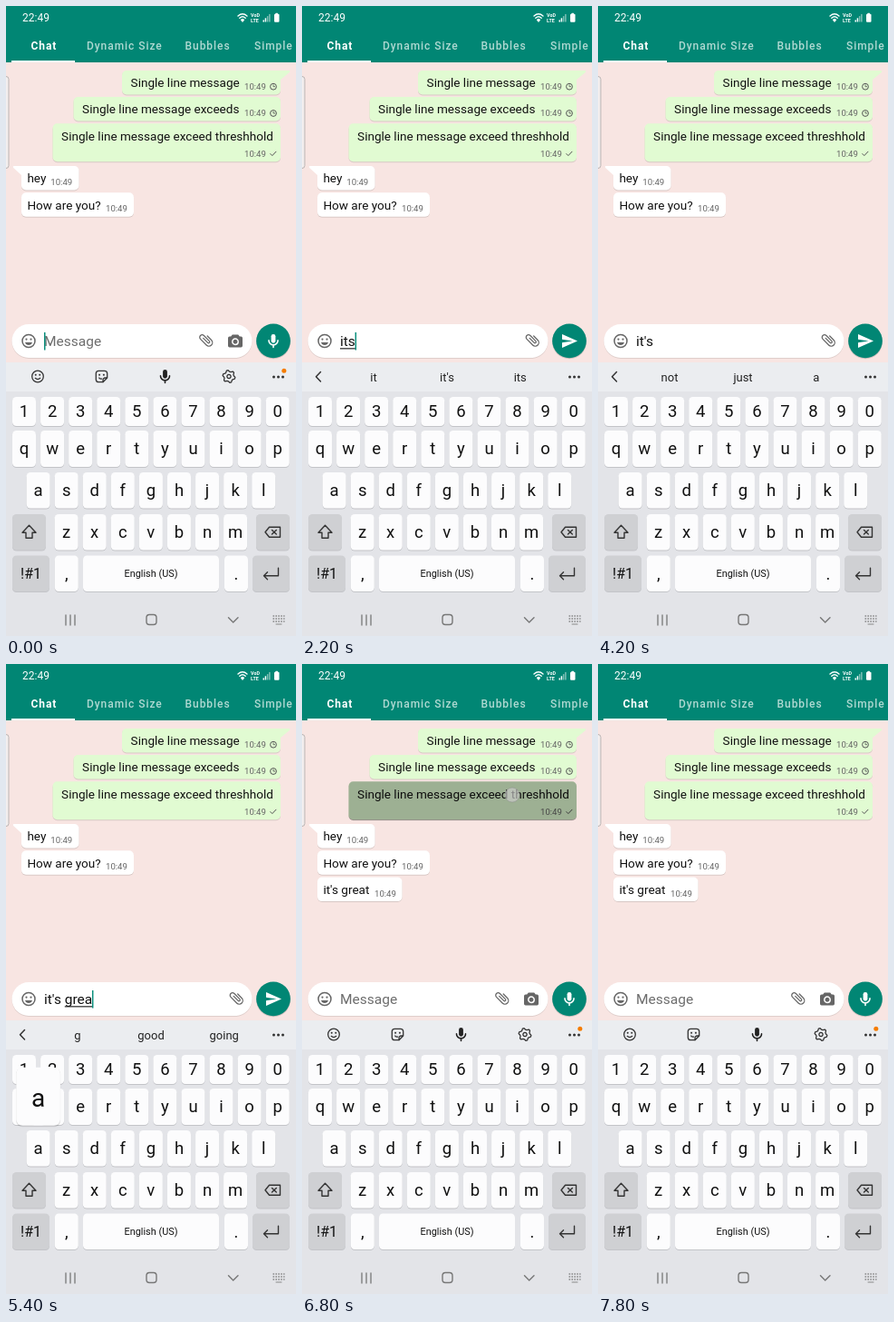
Write an HTML page that moves like this. It is 320 by 693 pixels and loops after 8 s.

```html
<!DOCTYPE html>
<html lang="en">
<head>
<meta charset="utf-8">
<title>Chat typing</title>
<style>
  html, body { margin: 0; width: 100%; height: 100%; overflow: hidden; background: #f8e5e2; }
  svg { display: block; width: 100vw; height: 100vh; }
  text { font-family: Roboto, sans-serif; white-space: pre; fill: #111; }
  .tab { font-size: 12px; font-weight: 500; letter-spacing: .95px; fill: #b0d9d2; }
  .msg { font-size: 13.55px; }
  .time { font-size: 9.6px; fill: #666; }
  .key { font-size: 18.5px; text-anchor: middle; }
  .field { font-size: 15.5px; }
  .hint { font-size: 13px; text-anchor: middle; fill: #222; }
  .line { fill: none; stroke-linecap: round; stroke-linejoin: round; }
</style>
</head>
<body>
<svg id="stage" viewBox="0 0 320 693"></svg>
<script>
const TEAL = '#018674', GREY = '#666', INK = '#333';
const stage = document.getElementById('stage');

const rect = (x, y, w, h, r, fill, extra = '') =>
  `<rect x="${x}" y="${y}" width="${w}" height="${h}" rx="${r}" fill="${fill}" ${extra}/>`;
const circle = (x, y, r, fill, extra = '') =>
  `<circle cx="${x}" cy="${y}" r="${r}" fill="${fill}" ${extra}/>`;
const text = (x, y, cls, str, extra = '') =>
  `<text x="${x}" y="${y}" class="${cls}" ${extra}>${str}</text>`;
const line = (d, color, width = 1.4) =>
  `<path class="line" d="${d}" stroke="${color}" stroke-width="${width}"/>`;
const shape = (d, fill) => `<path d="${d}" fill="${fill}"/>`;
const group = (x, y, body, extra = '') =>
  `<g transform="translate(${x} ${y}) ${extra}">${body}</g>`;
const part = (id, body) => `<g id="${id}">${body}</g>`;

// Icons, centred on 0,0
const mic = color => rect(-2.4, -7.6, 4.8, 9.8, 2.4, color) +
  line('M-5 -.6a5 5 0 0 0 10 0M0 4.6V7', color, 1.6);
const smile = (r, color, w) => circle(0, 0, r, 'none', `stroke="${color}" stroke-width="${w}"`) +
  circle(-r * .36, -r * .28, r * .16, color) + circle(r * .36, -r * .28, r * .16, color);
const clip = line('M5.8 -2V4.3a3.9 3.9 0 0 1 -7.8 0V-5a2.7 2.7 0 0 1 5.4 0V3.5a1.25 1.25 0 0 1 -2.5 0V-3.5', GREY, 1.25);
const camera = shape('M-3.2 -7H3.2L4.8 -5H6.3A1.7 1.7 0 0 1 8 -3.3V5.3A1.7 1.7 0 0 1 6.3 7H-6.3A1.7 1.7 0 0 1 -8 5.3V-3.3A1.7 1.7 0 0 1 -6.3 -5H-4.8Z', GREY) +
  circle(0, .8, 3.2, GREY, 'stroke="#fff" stroke-width="1.5"');
const gear = line('M' + Array.from({ length: 24 }, (_, i) => {
  const a = (i + .5) * Math.PI / 12, r = i % 4 < 2 ? 6.9 : 5.4;
  return `${(r * Math.cos(a)).toFixed(2)} ${(r * Math.sin(a)).toFixed(2)}`;
}).join('L') + 'Z', INK, 1.3) + circle(0, 0, 2.1, 'none', `stroke="${INK}" stroke-width="1.3"`);
const dots = [-5, 0, 5].map(x => circle(x, 0, 1.5, INK)).join('');

function bubble(x, y, w, h, str, timeX, mine, tail) {
  const fill = mine ? '#e1fbd2' : '#fff';
  const tip = mine ? `M${x + w - 6} ${y}H312.5Q314 ${y + .7} 312.8 ${y + 2}L${x + w} ${y + 10}Z`
                   : `M${x + 6} ${y}H8.5Q7 ${y + .7} 8.2 ${y + 2}L${x} ${y + 10}Z`;
  return rect(x, y + .9, w, h, 5, 'rgba(0,0,0,.13)') + rect(x, y, w, h, 5, fill) +
    (tail ? shape(tip, fill) : '') +
    text(mine ? x + 9.6 : x + 6.4, y + 18.4, 'msg', str) +
    text(timeX, y + h - 5.6, 'time', '10:49');
}
const clock = y => circle(295, y, 3.4, 'none', 'stroke="#555" stroke-width="1"') +
  line(`M295 ${y - 1.8}V${y}H296.8`, '#555', .8);

// Keyboard
const keys = {};
function key(x, y, w, h, label, opts = {}) {
  keys[label] = { x, y, w, h };
  const { fill = '#fcfcfd', size = 18.5, base = y + h / 2 + 6.3 } = opts;
  return rect(x, y + 1, w, h, 4.5, '#c3c4c8') + rect(x, y, w, h, 4.5, fill) +
    (opts.icon ? group(x + w / 2, y + h / 2, opts.icon)
               : text(x + w / 2, base, 'key', label, `style="font-size:${size}px"`));
}
const row = (chars, x, y, h) =>
  [...chars].map((c, i) => key(x + i * 31.08, y, 26, h, c)).join('');
const dark = '#cfd0d3';
const keyboard =
  rect(0, 392, 320, 301, 0, '#e3e4e8') + rect(0, 392, 320, 32, 0, '#ebedf0') +
  row('1234567890', 7, 430, 32) + row('qwertyuiop', 7, 467, 40) +
  row('asdfghjkl', 22.6, 513, 39.5) + row('zxcvbnm', 53.6, 559, 39.5) +
  key(7, 559, 37, 39.5, 'shift', { fill: dark, icon: line('M0 -7.5L7.5 .5H3.5V6.5H-3.5V.5H-7.5Z', INK) }) +
  key(276, 559, 37, 39.5, 'del', { fill: dark, icon: line('M-8.5 0L-4 -5.5H8V5.5H-4ZM-1 -2.3L3.8 2.3M3.8 -2.3L-1 2.3', INK) }) +
  key(7, 604.5, 41, 39.5, '!#1', { fill: dark, size: 16, base: 630 }) +
  key(53.8, 604.5, 26, 39.5, ',') +
  key(85, 604.5, 150, 39.5, 'English (US)', { size: 10.9, base: 628.3 }) +
  key(241, 604.5, 26, 39.5, '.') +
  key(272, 604.5, 41, 39.5, 'enter', { fill: dark, icon: line('M8 -6V2.5H-8M-4 -1.5L-8 2.5L-4 6.5', INK) });

const navBar =
  line('M66 670V681M71 670V681M76 670V681', '#777', 1.3) +
  rect(155, 669.5, 11, 11, 3.2, 'none', 'stroke="#777" stroke-width="1.4"') +
  line('M245.5 672.8L250.7 678L256 672.8', '#777') +
  [671, 674, 677].map(y => line(`M294.5 ${y}H307.5`, '#888', 1.5).replace('class="line"', 'fill="none" stroke-dasharray="1.6 1.3"')).join('') +
  line('M298 680H304', '#888', 1);

const header =
  rect(0, 0, 320, 62, 0, TEAL) +
  text(18, 17, '', '22:49', 'style="font-size:12px;fill:#fff"') +
  line('M256 11Q261 6.5 266 11M257.8 13.3Q261 10.4 264.2 13.3', '#fff', 1.4) +
  shape('M258.8 15.2Q261 13 263.2 15.2L261 18Z', '#fff') +
  text(270, 12, '', 'VoD', 'style="font-size:5.4px;font-weight:700;fill:#fff"') +
  text(270, 17.5, '', 'LTE', 'style="font-size:5.4px;font-weight:700;fill:#fff"') +
  [0, 1, 2, 3].map(i => rect(283.5 + i * 2.2, 15.5 - i * 2.2, 1.5, 2 + i * 2.2, 0, i < 2 ? '#fff' : '#7fbfb5')).join('') +
  rect(296, 8.8, 5.5, 9, 1, '#fff') + rect(297.5, 7.8, 2.5, 2, .4, '#fff') +
  text(27.5, 48, 'tab', 'Chat', 'style="fill:#fff;font-weight:700"') +
  text(89, 48, 'tab', 'Dynamic Size') + text(197.5, 48, 'tab', 'Bubbles') + text(274, 48, 'tab', 'Simple') +
  rect(6, 60, 70, 2, 0, '#fff');

stage.innerHTML =
  rect(0, 0, 320, 693, 0, '#f8e5e2') + header +
  rect(-6, 77.5, 9, 101, 3, '#f3eeee', 'stroke="#b9b3b2" stroke-width="1"') +
  bubble(128, 71, 175, 26.5, 'Single line message', 263, true, true) + clock(88.7) +
  bubble(74.5, 100, 228.5, 26.5, 'Single line message exceeds', 263, true) + clock(118) +
  bubble(51.5, 129.3, 251.5, 42, 'Single line message exceed threshhold', 263, true) +
  line('M291.8 162.6L293.8 164.6L298 160.2', '#555', 1) +
  part('held', rect(51.5, 129.3, 251.5, 42.6, 5, '#000')) +
  bubble(17, 176, 63.5, 26.5, 'hey', 49.3, false, true) +
  bubble(17, 205.3, 124, 26.5, 'How are you?', 110, false) +
  part('sent', bubble(17, 234.6, 93.5, 26.5, "it's great", 80, false)) +
  rect(6.5, 351, 265, 37, 18.5, 'rgba(0,0,0,.1)') + rect(6.5, 350, 265, 37, 18.5, '#fff') +
  group(25, 368.5, smile(7, GREY, 1.5) + shape('M-4 1.5H4A4.2 4.2 0 0 1 -4 1.5Z', GREY)) +
  text(42, 374.4, 'field', 'Message', 'id="placeholder" style="fill:#6d6d6d"') +
  text(42, 374.4, 'field', '', 'id="done"') + text(42, 374.4, 'field', '', 'id="word"') +
  rect(42, 376.3, 0, 1.1, 0, '#111', 'id="underline"') +
  rect(42, 359, 1.5, 19.5, 0, '#0a8f7c', 'id="caret"') +
  part('clip', group(0, 368.5, clip, 'rotate(-45)')) +
  part('camera', group(253, 368.5, camera)) +
  circle(295, 369.3, 19, 'rgba(0,0,0,.16)') + circle(295, 368.4, 18.8, TEAL) +
  part('voice', group(295, 368.5, mic('#fff'))) +
  part('send', shape('M287 376V370.2L298.5 368.5L287 366.8V361L304 368.5Z', '#fff')) +
  keyboard +
  part('tools',
    group(35, 407.5, smile(6.3, INK, 1.3) + line('M-2.8 1.8Q0 4.4 2.8 1.8', INK, 1.2)) +
    group(105.5, 407.5, line('M1.5 6.2H-3.2A3 3 0 0 1 -6.2 3.2V-3.2A3 3 0 0 1 -3.2 -6.2H3.2A3 3 0 0 1 6.2 -3.2V1.5L1.5 6.2V4A2.5 2.5 0 0 1 4 1.5H6.2', INK, 1.3) +
      circle(-2.4, -1.8, 1, INK) + circle(2.4, -1.8, 1, INK) + line('M-2.8 1.5Q-1.4 3 .3 2.4', INK, 1.1)) +
    group(175.5, 407.5, mic('#222')) + group(246, 407.5, gear) +
    circle(306.8, 401.3, 2.5, '#f57c00')) +
  part('hints', line('M20.5 402.5L15.5 407.7L20.5 413', INK, 1.5) +
    [79, 160, 240.7].map(x => text(x, 412.5, 'hint', '')).join('')) +
  group(300.5, 408, dots) + navBar +
  rect(0, 0, 0, 0, 4.5, 'rgba(0,0,0,.36)', 'id="pressed"') +
  part('popup', rect(-24.5, -32, 49, 65, 7, 'rgba(0,0,0,.12)') + rect(-24.3, -32.5, 48.6, 64, 7, '#fcfcfd') +
    text(0, 11, '', '', 'id="popupLabel" style="font-size:28px;text-anchor:middle"')) +
  part('touch', circle(0, 0, 8, 'rgba(205,205,205,.65)', 'stroke="rgba(130,130,130,.4)" stroke-width="1"'));

const $ = id => document.getElementById(id);
const show = (id, on) => { $(id).style.display = on ? '' : 'none'; };

// Each step: start time and what changes. press, popup and touch last one step only.
const LOOP = 8000;
const steps = [
  [0, { done: '', word: '', caret: 1, tools: 1, camera: 1, sent: 0, held: 0, hints: [] }],
  [400, { press: 'i', popup: 'i', touch: [236, 496] }],
  [600, { word: 'i', popup: 'i' }],
  [800, { press: 't', popup: 't', touch: [135, 503] }],
  [1000, { word: 'it', popup: 't', camera: 0 }],
  [1200, { tools: 0, hints: ['it', "it's", 'its'] }],
  [1600, { press: 's', popup: 's', touch: [64, 547] }],
  [1800, { word: 'its', popup: 's' }],
  [2000, {}],
  [2400, { caret: 0 }],
  [2800, { caret: 1, touch: [160, 412] }],
  [3000, { done: "it's ", word: '', hints: ['not', 'just', 'a'] }],
  [3400, { caret: 0 }],
  [3800, { caret: 1 }],
  [4200, { caret: 0 }],
  [4400, { press: 'g', popup: 'g', touch: [158, 544] }],
  [4600, { caret: 1, word: 'g', press: 'r', popup: 'r', touch: [112, 500] }],
  [4800, { word: 'gr', press: 'e', popup: 'e', touch: [80, 499], hints: ['g', 'good', 'going'] }],
  [5000, { word: 'gre', popup: 'e' }],
  [5200, { press: 'a', touch: [38, 543] }],
  [5400, { word: 'grea', popup: 'a' }],
  [5600, { press: 't', popup: 't', touch: [142, 503] }],
  [5800, { word: 'great', popup: 't' }],
  [6000, { hints: ['great', 'greatly', 'greater'] }],
  [6200, { touch: [294, 372] }],
  [6400, { done: '', word: '', tools: 1, camera: 1, sent: 1, caret: 0 }],
  [6600, { held: .1, touch: [232, 144] }],
  [6800, { held: .3, touch: [232, 144] }],
  [7000, { held: .3 }],
  [7200, { held: .16 }],
  [7400, { held: .05 }],
  [7600, { held: 0 }]
];
const states = [];
for (const [, change] of steps)
  states.push({ ...states.at(-1), press: '', popup: '', touch: null, ...change });

function render(s) {
  const typed = s.done + s.word;
  show('placeholder', !typed);
  $('done').textContent = s.done;
  $('word').textContent = s.word;
  const wordX = 42 + (s.done ? $('done').getComputedTextLength() : 0);
  const wordW = s.word ? $('word').getComputedTextLength() : 0;
  $('word').setAttribute('x', wordX);
  $('underline').setAttribute('x', wordX);
  $('underline').setAttribute('width', wordW);
  $('caret').setAttribute('x', wordX + wordW - (typed ? .3 : 0));
  show('caret', s.caret);
  show('camera', s.camera);
  $('clip').setAttribute('transform', `translate(${s.camera ? 219.5 : 253} 0)`);
  show('voice', !typed);
  show('send', typed);
  show('sent', s.sent);
  $('held').setAttribute('opacity', s.held);
  show('tools', s.tools);
  show('hints', !s.tools);
  $('hints').querySelectorAll('text').forEach((el, i) => { el.textContent = s.hints[i] || ''; });

  show('pressed', s.press);
  if (s.press)
    for (const [a, b] of [['x', 'x'], ['y', 'y'], ['width', 'w'], ['height', 'h']])
      $('pressed').setAttribute(a, keys[s.press][b]);
  show('popup', s.popup);
  if (s.popup) {
    const k = keys[s.popup];
    $('popup').setAttribute('transform', `translate(${k.x + k.w / 2} ${k.y + k.h / 2 - 56.5})`);
    $('popupLabel').textContent = s.popup;
  }
  show('touch', s.touch);
  if (s.touch) $('touch').setAttribute('transform', `translate(${s.touch})`);
}

let current = -1;
const start = performance.now();
function tick(now) {
  const t = Math.max(0, now - start) % LOOP;
  const index = steps.findLastIndex(([at]) => at <= t);
  if (index !== current) render(states[current = index]);
  requestAnimationFrame(tick);
}
tick(start);
</script>
</body>
</html>
```
